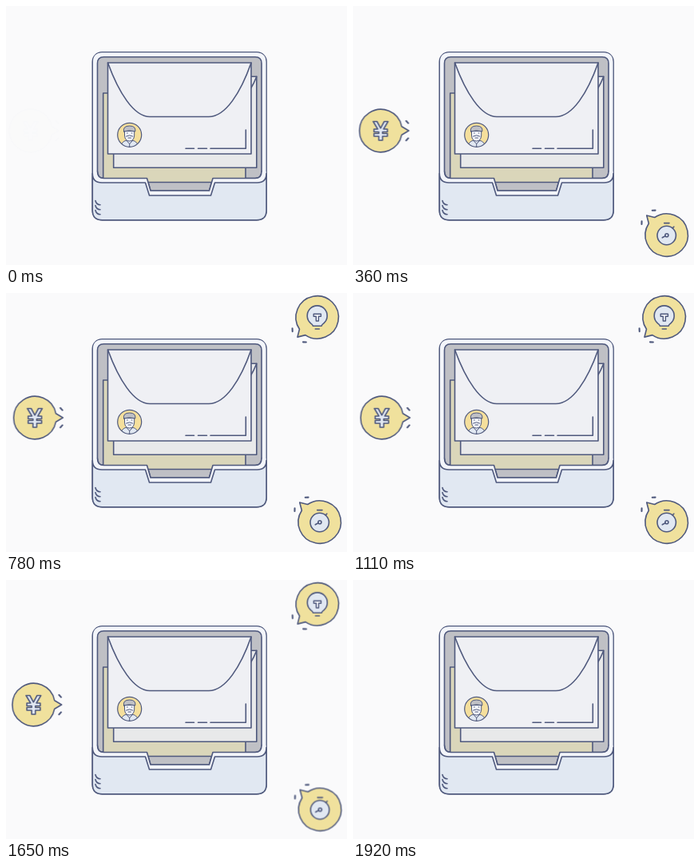
An HTML page for the animation above (3.15 s loop, 427 by 324 pixels).

```html
<!DOCTYPE html>
<html lang="en">
<head>
<meta charset="utf-8">
<title>Inbox tray</title>
<style>
  html, body { margin: 0; width: 100%; height: 100%; overflow: hidden; background: #fafafb; }
  svg { display: block; width: 100vw; height: 100vh; }
  .ink { stroke: #4f597d; stroke-width: 1.6; stroke-linejoin: round; stroke-linecap: round; fill: none; }
  .yellow { fill: #f0e19d; }
  .grey { fill: #bfc0c5; }
  .pale { fill: #f3f5fa; }
  .blue { fill: #e1e8f2; }
  .sheet { fill: #dad6ba; }
  .back { fill: #e8e9ea; }
  .front { fill: #eff0f4; }
  .fine { stroke-width: 1; }
  .bold { stroke-width: 2.1; }

  .note { opacity: 0; animation: 3150ms linear infinite; }
  .yen { animation-name: yen; }
  .timer { animation-name: timer; }
  .bulb { animation-name: bulb; }

  @keyframes yen {
    0% { opacity: 0; transform: translate(-4.6px, 0); animation-timing-function: ease-out; }
    6.67% { opacity: 1; transform: translate(-1.6px, 0); }
    11.43% { opacity: 1; transform: translate(-.7px, 0); }
    17.14% { transform: translate(0, 0); }
    24.76% { transform: translate(.7px, 0); }
    34% { transform: translate(.8px, 0); }
    45.71% { transform: translate(0, 0); }
    51.43% { transform: translate(-.6px, 0); }
    56.19% { opacity: 1; transform: translate(-2px, 0); }
    60.9% { opacity: 0; transform: translate(-4.6px, 0); }
    60.95%, 100% { opacity: 0; transform: translate(-4.6px, 0); }
  }
  @keyframes timer {
    0%, 3.8% { opacity: 0; transform: translate(4.4px, 5px); animation-timing-function: ease-out; }
    10.48%, 51.43% { opacity: 1; transform: translate(0, 0); }
    56.19% { opacity: 1; transform: translate(2px, 2.4px); }
    60.9% { opacity: 0; transform: translate(4.4px, 5px); }
    60.95%, 100% { opacity: 0; transform: translate(4.4px, 5px); }
  }
  @keyframes bulb {
    0%, 14.29% { opacity: 0; transform: translate(-3px, 9px); }
    17.14% { opacity: .5; transform: translate(-1.6px, 4.5px); }
    20% { opacity: 1; transform: translate(-.4px, 1px); }
    22.86%, 51.43% { opacity: 1; transform: translate(0, 0); }
    56.19% { opacity: 1; transform: translate(.8px, -1px); }
    60.9% { opacity: 0; transform: translate(1.8px, -2px); }
    60.95%, 100% { opacity: 0; transform: translate(1.8px, -2px); }
  }
</style>
</head>
<body>
<svg viewBox="0 0 427 324" preserveAspectRatio="none">
  <defs>
    <!-- speech bubble pointing right, centred on the origin -->
    <g id="bubble">
      <path class="ink yellow" d="M26.2-5.2 35 0 26.2 5.2A26.7 26.7 0 1 1 26.2-5.2Z"/>
      <path class="ink bold" d="M31.8-12.2 34.4-9.4M31.8 12.2 34.4 9.4"/>
    </g>
    <clipPath id="badge"><circle cx="154.7" cy="161.3" r="15"/></clipPath>
  </defs>

  <!-- tray -->
  <rect class="ink blue" x="108.3" y="57.7" width="217.8" height="210" rx="12"/>
  <path class="pale" d="M109 210V70Q109 58.4 120 58.4H314Q325.4 58.4 325.4 70V210Q325.4 221 314 221H120Q109 221 109 210Z"/>
  <path class="ink grey" d="M122.500 63.700H312Q320 63.700 320 71.700V207Q320 215.500 312 215.500H259L254.500 231H181L176.500 215.500H122.500Q114.500 215.500 114.500 207V71.700Q114.500 63.700 122.500 63.700Z"/>

  <!-- papers -->
  <path class="ink sheet" d="M121.700 109H300V220.500H121.700Z"/>
  <path class="ink back" d="M134.700 88.300H313.800V202.300H134.700Z"/>
  <path class="ink" d="M313.800 88.300Q310.500 97 306 104"/>
  <path class="ink front" d="M127.500 71H307V185H127.500Z"/>
  <path class="ink" d="M127.500 71C141 108 160 138.500 180 138.500H254C275 138.500 294 108 307 71"/>
  <path class="ink" d="M225 178.300H235.500M240.500 178.300H251.500M256 178.300H300.300V155"/>

  <!-- portrait badge -->
  <circle class="yellow" cx="154.700" cy="161.300" r="15" style="fill:#f5df9c"/>
  <g clip-path="url(#badge)">
    <path class="ink blue fine" d="M143 178Q144 169.500 151 168H158Q165.500 169.500 166.500 178Z"/>
    <path class="ink pale fine" d="M148.500 157V162Q149 169 154.700 169Q160 169 160.700 162V157Z"/>
    <path class="ink grey fine" d="M147.500 157Q146 150 154.700 150Q163 150 161.800 157Q154.700 154.500 147.500 157Z"/>
    <path class="ink fine" d="M150.500 163Q154.700 160.500 158.800 163M153 165H156.500M151 168.500 154.700 172.500 158.500 168.500M154.700 172.500V176M151.500 159H152.200M157.200 159H157.900"/>
  </g>
  <circle class="ink" cx="154.700" cy="161.300" r="15" style="stroke-width:1.200"/>

  <!-- front lip -->
  <path class="pale" d="M109 207H114.500Q114.500 215.500 122.500 215.500H176.500L181 231H254.500L259 215.500H312Q320 215.500 320 207H325.500Q325.500 221 315 221H261.500L257 237H179.500L175 221H120Q109 221 109 207Z"/>
  <path class="ink" d="M114.500 207Q114.500 215.500 122.500 215.500H176.500L181 231H254.500L259 215.500H312Q320 215.500 320 207"/>
  <path class="ink blue" d="M108.300 209.500Q108.300 221 120 221H174.500L179.500 237H256.500L261.500 221H314.500Q326.100 221 326.100 209.500V255.700Q326.100 267.700 314 267.700H120.300Q108.300 267.700 108.300 255.700Z"/>
  <path class="ink" d="M112 243.500Q113 248.500 118 248.700M112 249.500Q113 254.500 118 254.700M112 255.500Q113 260.500 118 260.700"/>

  <g class="note yen">
    <use href="#bubble" x="35.500" y="156"/>
    <path class="ink blue" d="M26 144.500H30.800L35.300 152.800 39.800 144.500H44.600L39 154H43.800V157.500H37.700V159.500H43.800V163H37.700V168H33V163H27V159.500H33V157.500H27V154H31.700Z"/>
  </g>

  <g class="note timer">
    <use href="#bubble" transform="translate(392.700 286.600) rotate(-135.500)"/>
    <circle class="ink blue" cx="392.700" cy="287" r="11.700"/>
    <path class="ink" d="M389.700 271.600H396M400.300 277.800 401.800 276.200M387.300 289.800 391 287.800"/>
    <circle class="ink" cx="392.900" cy="286.800" r="2"/>
  </g>

  <g class="note bulb">
    <use href="#bubble" transform="translate(389.700 30.400) rotate(135)"/>
    <path class="ink blue" d="M384.500 41.300Q384.300 39.700 381.500 37.800A12.500 12.500 0 1 1 397.900 37.800Q395.200 39.700 395 41.300Z"/>
    <path class="ink" d="M387.300 45H392.300"/>
    <path class="ink pale" style="stroke-width:1.400" d="M385.200 26.200H394.400V29.200H391.400V35H388.300V29.200H385.200Z"/>
  </g>
</svg>
</body>
</html>
```
